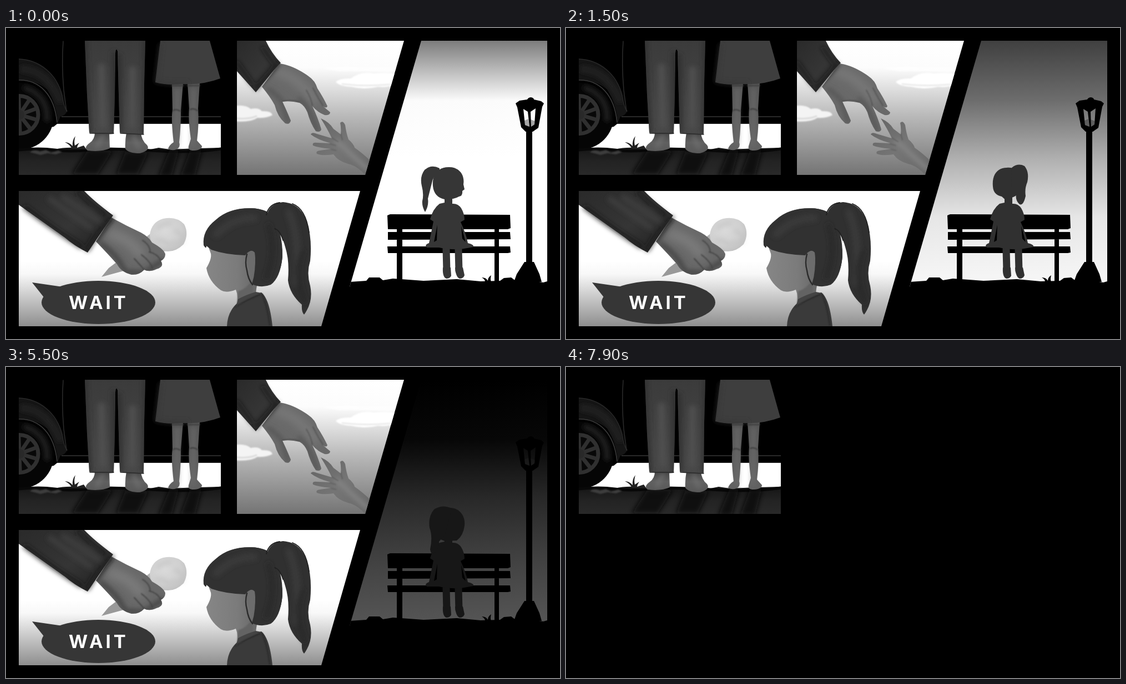
Recreate the animation shown at these times as an HTML page. Size 998 px wide and 561 px high, loop 8000 ms.

```html
<!DOCTYPE html>
<html lang="en">
<head>
<meta charset="utf-8">
<title>Wait</title>
<style>
html, body { margin: 0; width: 100%; height: 100%; overflow: hidden; background: #000; }
svg { display: block; width: 100vw; height: 100vh; }
.line { fill: none; stroke-linecap: round; stroke-linejoin: round; }
.say { font: 700 33px Inter, "Open Sans", sans-serif; letter-spacing: 5px; }
.off { visibility: hidden; }
#girl path, #girl ellipse { fill: var(--c); }
#girl .leg { fill: none; stroke: var(--c); stroke-width: 13; stroke-linecap: round; stroke-linejoin: round; }
#girl .gap { fill: #000; }
</style>
</head>
<body>
<svg viewBox="0 0 998 561" preserveAspectRatio="none">
<defs>
  <clipPath id="p1"><path d="M23 23H387V265H23Z"/></clipPath>
  <clipPath id="p2"><path d="M416 23H717L647 265H416Z"/></clipPath>
  <clipPath id="p3"><path d="M23 294H638L568 538H23Z"/></clipPath>
  <clipPath id="p4"><path d="M748 23H975V467H619Z"/></clipPath>
  <clipPath id="pants"><path id="pantsShape" d="M142 23H251L249 100L248 192Q226 193 205 189L203 120L201 42Q198 34 197 46L196 120L194 191Q172 193 150 189L146 120Z"/></clipPath>
  <clipPath id="adult"><path id="adultShape" d="M492 64C510 66 530 76 545 87Q557 95 561 109Q572 126 579 141Q577 146 571 141L584 152Q584 158 574 157Q561 152 552 141Q562 162 568 183Q566 189 558 186Q548 171 543 152Q538 140 529 135Q511 131 498 133Q506 150 513 167Q511 175 503 172Q489 160 484 139Q476 124 461 106Z"/></clipPath>
  <clipPath id="grip"><path id="gripShape" d="M190 342Q215 356 243 369Q258 377 263 387Q285 399 287 408Q287 416 279 420Q286 431 271 435Q258 441 249 436Q240 446 226 445Q207 440 200 426Q184 408 162 385Z"/></clipPath>
  <filter id="b1" x="-20%" y="-20%" width="140%" height="140%"><feGaussianBlur stdDeviation="1.2"/></filter>
  <filter id="b4" x="-40%" y="-40%" width="180%" height="180%"><feGaussianBlur stdDeviation="4"/></filter>
  <filter id="b8" x="-50%" y="-50%" width="200%" height="200%"><feGaussianBlur stdDeviation="8"/></filter>
  <linearGradient id="day2" gradientUnits="userSpaceOnUse" x1="0" y1="23" x2="0" y2="265">
    <stop offset="0" stop-color="#fff"/><stop offset=".2" stop-color="#fcfcfc"/>
    <stop offset=".56" stop-color="#b9b9b9"/><stop offset="1" stop-color="#747474"/>
  </linearGradient>
  <linearGradient id="day3" gradientUnits="userSpaceOnUse" x1="0" y1="420" x2="0" y2="538">
    <stop offset="0" stop-color="#fff"/><stop offset=".2" stop-color="#f8f8f8"/><stop offset="1" stop-color="#8e8e8e"/>
  </linearGradient>
  <linearGradient id="night" gradientUnits="userSpaceOnUse" x1="0" y1="23" x2="0" y2="455">
    <stop offset="0"/><stop offset=".25"/><stop offset=".49"/><stop offset=".735"/><stop offset="1"/>
  </linearGradient>
  <linearGradient id="soil" x1="0" y1="0" x2="0" y2="1"><stop offset="0" stop-color="#151515"/><stop offset=".5" stop-color="#232323"/><stop offset="1" stop-color="#292929"/></linearGradient>
  <linearGradient id="cloth" x1="0" y1="0" x2="0" y2="1"><stop offset="0" stop-color="#3b3b3b"/><stop offset="1" stop-color="#484848"/></linearGradient>
  <linearGradient id="foot" x1="0" y1="0" x2="0" y2="1"><stop offset="0" stop-color="#424242"/><stop offset=".5" stop-color="#606060"/><stop offset="1" stop-color="#585858"/></linearGradient>
  <linearGradient id="shin" x1="0" y1="0" x2="0" y2="1"><stop offset="0" stop-color="#555"/><stop offset="1" stop-color="#626262"/></linearGradient>
  <linearGradient id="sleeve" x1="0" y1="0" x2="1" y2="1"><stop offset="0" stop-color="#2a2a2a"/><stop offset=".55" stop-color="#353535"/><stop offset="1" stop-color="#1f1f1f"/></linearGradient>
  <linearGradient id="skin" x1="0" y1="0" x2="1" y2="0"><stop offset="0" stop-color="#868686"/><stop offset=".6" stop-color="#7b7b7b"/><stop offset="1" stop-color="#666"/></linearGradient>
  <linearGradient id="small" x1="0" y1="0" x2="1" y2="1"><stop offset="0" stop-color="#636363"/><stop offset=".5" stop-color="#757575"/><stop offset="1" stop-color="#696969"/></linearGradient>
  <radialGradient id="scoop" cx=".4" cy=".35" r=".75"><stop offset="0" stop-color="#dadada"/><stop offset=".6" stop-color="#d0d0d0"/><stop offset="1" stop-color="#bcbcbc"/></radialGradient>
</defs>
<rect width="998" height="561"/>

<g id="car" clip-path="url(#p1)">
  <path d="M23 172H387V222H23Z" fill="#fff"/>
  <path d="M23 23H387V173H92L86 178L23 190Z"/>
  <path d="M23 56C60 57 92 83 101 122Q104 142 110 150Q108 157 98 160L93 172Q92 140 74 111Q54 94 23 94Z" fill="#151515"/>
  <path d="M30 74Q75 78 97 130" class="line" stroke="#202020" stroke-width="12" filter="url(#b4)"/>
  <path d="M23 56C60 57 92 83 101 122Q104 142 110 150" class="line" stroke="#292929" stroke-width="1.5"/>
  <path d="M103 24Q100 65 104 112L109 150" class="line" stroke="#2c2c2c" stroke-width="1.5"/>
  <path d="M23 94C60 93 87 120 92 170" class="line" stroke="#3b3b3b" stroke-width="1.6"/>
  <path d="M100 160H387" stroke="#292929" stroke-width="2"/>
  <path d="M92 172H387" stroke="#141414" stroke-width="2"/>
  <circle cx="26" cy="159" r="60" fill="#050505"/>
  <path d="M35 108Q75 122 74 165" class="line" stroke="#202020" stroke-width="9" filter="url(#b4)"/>
  <circle cx="24" cy="156.500" r="34" fill="#080808" stroke="#303030" stroke-width="7"/>
  <g id="spokes" stroke="#2f2f2f" stroke-width="7"></g>
  <circle cx="24" cy="156.500" r="9" fill="#292929"/>
  <path d="M23 219Q60 215 88 219Q112 213 145 218L260 219L275 216L295 219Q345 217 387 216V265H23Z" fill="url(#soil)"/>
  <path d="M23 220Q60 216 88 220T150 220T260 221T387 218" class="line" stroke="#080808" stroke-width="5"/>
  <path d="M43 224Q51 218 61 223L72 220L81 225L94 221L101 224L90 228L75 226L62 229Z" fill="#3d3d3d" filter="url(#b1)"/>
  <path d="M119 218Q114 209 106 206Q114 206 120 213Q119 202 125 195Q122 204 124 212L132 207Q128 213 128 216L140 212L145 219Z" fill="#202020"/>
</g>

<g id="pair" clip-path="url(#p1)">
  <g filter="url(#b4)" opacity=".9">
    <path d="M146 221H193L166 264H118ZM214 224H257L238 264H198ZM294 220H312L299 268H274ZM331 220H353L341 268H313Z" fill="#070707"/>
  </g>
  <path d="M160 188H186L187 217Q172 224 147 221Q139 216 151 207Q160 201 160 188ZM217 188H243Q244 203 254 211Q261 221 241 226Q221 226 215 218Q214 205 217 188Z" fill="url(#foot)"/>
  <path d="M175 194L164 214M230 196L239 216" class="line" stroke="#737373" stroke-width="5" filter="url(#b4)"/>
  <use href="#pantsShape" fill="url(#cloth)"/>
  <g clip-path="url(#pants)" class="line" filter="url(#b4)">
    <path d="M142 23L147 125L151 190M194 45V190M204 50L206 190M251 23L248 190" stroke="#2e2e2e" stroke-width="7"/>
    <path d="M172 70L174 175M228 75L227 175" stroke="#505050" stroke-width="12"/>
  </g>
  <path d="M151 190H194M206 190L248 192" class="line" stroke="#292929" stroke-width="1.5"/>
  <path d="M299 100H319L315 148Q315 180 312 206Q315 215 307 219Q299 222 292 218Q294 211 302 206Q297 165 300 148Z" fill="url(#shin)"/>
  <path d="M327 100H349L346 145Q348 173 344 203L353 213Q353 220 338 221Q327 221 329 213L333 200Q328 165 330 145Z" fill="url(#shin)"/>
  <path d="M309 110L308 210M338 110L337 211" class="line" stroke="#737373" stroke-width="4" filter="url(#b4)"/>
  <path d="M301 149Q306 145 314 150M332 147Q338 144 345 149M299 104H319M327 104H349" class="line" stroke="#3e3e3e" stroke-width="2" filter="url(#b1)"/>
  <path d="M278 23H367L386 91Q355 103 318 101Q292 104 269 98Z" fill="#3e3e3e"/>
  <path d="M279 30L271 96Q300 101 327 99" class="line" stroke="#343434" stroke-width="4" filter="url(#b4)"/>
</g>

<g id="rest">
<g clip-path="url(#p2)">
  <path d="M416 23H717V265H416Z" fill="url(#day2)"/>
  <g filter="url(#b1)">
    <path d="M570 73Q608 68 650 72Q680 70 708 74L690 80Q640 77 600 78Z" fill="#fff" opacity=".7"/>
    <path d="M594 97Q602 90 621 91Q640 77 662 82Q688 79 708 84L703 101Q690 108 670 106Q645 112 622 106Q600 105 594 97Z" fill="#fff"/>
    <path d="M606 101Q645 106 690 102" class="line" stroke="#ececec" stroke-width="3"/>
    <path d="M410 141Q430 137 441 146Q455 143 461 150Q478 149 480 157Q470 163 453 162Q440 171 410 168Z" fill="#f4f4f4"/>
    <path d="M416 163Q437 165 451 159" class="line" stroke="#ddd" stroke-width="3"/>
  </g>
  <use href="#adultShape" fill="#696969"/>
  <g clip-path="url(#adult)">
    <path d="M491 79Q528 90 557 131" class="line" stroke="#7a7a7a" stroke-width="15" filter="url(#b8)"/>
    <path d="M472 110Q487 119 498 133L508 168M528 128Q543 137 560 184" class="line" stroke="#555" stroke-width="7" filter="url(#b4)"/>
    <path d="M498 132Q514 128 529 133M541 112Q550 127 552 140M553 108Q561 125 571 140" class="line" stroke="#4b4b4b" stroke-width="1.4" filter="url(#b1)"/>
  </g>
  <path d="M416 23H468Q478 45 495 63Q488 69 473 88L450 116Q434 98 416 78Z" fill="url(#sleeve)"/>
  <path d="M489 65L450 109M463 36L481 62M416 62L444 101" class="line" stroke="#181818" stroke-width="5" filter="url(#b4)"/>
  <path d="M567 163Q583 170 590 182Q598 188 603 192Q604 180 602 171Q607 166 611 175Q613 190 617 201Q627 210 628 216Q640 224 656 239L648 266Q632 248 616 245Q598 240 590 228Q570 231 560 227Q557 222 566 221L585 218Q563 216 553 212Q551 206 560 207L585 208Q560 201 549 192Q551 187 560 191L587 199Q579 182 567 163Z" fill="url(#small)"/>
  <path d="M594 204Q610 215 618 225L650 253" class="line" stroke="#858585" stroke-width="7" filter="url(#b4)"/>
  <path d="M587 198L598 205M584 209L594 212M586 219L595 221M603 191L606 202" class="line" stroke="#555" stroke-width="1.2" filter="url(#b1)"/>
</g>

<g clip-path="url(#p3)">
  <path d="M23 294H638V538H23Z" fill="url(#day3)"/>
  <path d="M172 449L185 433L201 421L216 437Z" fill="#999"/>
  <path d="M244 383L263 369L294 399L275 407L254 404Z" fill="#b3b3b3"/>
  <path d="M259 373Q262 350 283 344Q307 339 321 354Q330 371 320 390Q306 404 290 403Q278 403 272 393Q259 388 259 373Z" fill="url(#scoop)"/>
  <path d="M270 383Q285 381 293 391Q307 384 318 385M273 361Q284 351 297 353M304 366Q314 368 318 377" class="line" stroke="#bfbfbf" stroke-width="4" filter="url(#b4)"/>
  <use href="#gripShape" fill="#686868"/>
  <g clip-path="url(#grip)" class="line">
    <path d="M190 372Q226 382 241 407" stroke="#7d7d7d" stroke-width="18" filter="url(#b8)"/>
    <path d="M172 390Q204 412 214 440L248 442L282 420M188 345L164 382" stroke="#474747" stroke-width="9" filter="url(#b4)"/>
    <path d="M246 383Q259 391 260 404M258 404Q273 407 279 420M244 409Q260 421 264 434M231 416Q243 429 249 436" stroke="#444" stroke-width="2" filter="url(#b1)"/>
  </g>
  <path d="M23 294H141Q159 313 193 338Q174 365 147 405Q123 393 106 378L23 319Z" fill="url(#sleeve)"/>
  <g class="line" filter="url(#b4)">
    <path d="M190 343Q163 369 147 399M130 296Q145 313 178 337M35 324Q84 362 135 394" stroke="#1a1a1a" stroke-width="7"/>
    <path d="M80 309L151 359M104 306L166 347" stroke="#3e3e3e" stroke-width="10"/>
  </g>

  <path d="M441 459Q494 474 498 410Q497 365 470 331Q451 322 419 327Q382 333 362 366L362 392L433 405Z" fill="#303030"/>
  <path d="M361 385L369 407Q371 416 361 433Q365 457 387 473Q397 479 414 472Q420 486 415 505L449 487Q451 467 454 455L449 402Z" fill="url(#skin)"/>
  <path d="M418 475Q433 471 443 455L447 485L416 501Z" fill="#636363" filter="url(#b1)"/>
  <path d="M356 392Q353 365 378 346Q402 324 442 325Q464 325 478 340Q499 365 498 413Q494 451 477 463Q460 470 443 462Q451 438 448 405Q438 399 431 410Q395 409 370 400L361 393Q361 400 356 392Z" fill="#313131"/>
  <path d="M433 409Q441 397 448 405Q451 424 445 445Q435 437 433 409Z" fill="#6c6c6c"/>
  <path d="M434 408Q430 423 434 437Q436 453 444 463" class="line" stroke="#2b2b2b" stroke-width="2.5"/>
  <path d="M470 338Q474 317 499 314Q530 316 542 350Q552 380 548 420Q541 442 548 465Q554 494 537 517Q532 512 533 499Q511 480 508 455Q511 420 503 395Q497 372 484 362Q489 374 475 349Z" fill="#303030"/>
  <path d="M469 337Q473 318 493 315M516 317Q540 326 546 369M484 362Q494 365 499 383" class="line" stroke="#202020" stroke-width="1.8"/>
  <g class="line" filter="url(#b4)">
    <path d="M379 372Q410 342 447 343M510 333Q530 381 523 459" stroke="#3a3a3a" stroke-width="12"/>
    <path d="M473 356Q488 402 469 450M534 403Q517 445 538 493" stroke="#272727" stroke-width="7"/>
  </g>
  <path d="M398 538Q399 511 418 495Q440 482 460 477Q475 489 480 538Z" fill="#3a3a3a"/>
  <path d="M418 489L414 504L426 496Q448 484 460 478L450 476Q433 481 418 489Z" fill="#444"/>
  <path d="M414 503Q428 493 457 481M461 480Q471 501 475 536" class="line" stroke="#292929" stroke-width="2" filter="url(#b1)"/>

  <path d="M47 459L102 467L70 488Z" fill="#363636"/>
  <ellipse cx="166.500" cy="495" rx="102.500" ry="39" fill="#363636"/>
  <text class="say" x="167" y="507" text-anchor="middle" fill="#fff">WAIT</text>
</g>

<g clip-path="url(#p4)">
  <path d="M619 23H975V467H619Z" fill="url(#night)"/>
  <path d="M619 458L649 456L654 450L673 450L679 455L697 452L725 454L752 456L812 453L855 457L890 456L897 451L910 450L918 456L937 455L968 459L975 457V470H619Z"/>
  <path d="M863 458Q863 453 857 450Q865 450 868 456Q868 450 874 446Q872 453 874 458Z"/>
  <path d="M687 338L692 336L908 337L909 361L904 363H688ZM688 368H908L909 381L688 382ZM687 394H908L909 405L904 406H688ZM704 361H714V458H704ZM880 361H888V458H880Z"/>
  <path d="M937 184H948V423H937ZM934 422H951L961 444L965 458H915L920 444Z"/>
  <path fill-rule="evenodd" d="M918 136L925 131L939 129Q941 125 946 125Q951 126 951 129L964 132L969 136L966 142L959 180L949 187H936L928 179L921 143ZM932 146L940 151L943 178L935 175ZM945 151L954 145L952 174L946 178Z"/>
  <path d="M934 167L941 164L943 178L935 175ZM945 165L953 168L952 174L946 178Z" fill="#222" opacity=".4"/>
  <g id="girl">
    <g data-legs="0">
      <path class="leg" d="M793 399L794 438M815 399L816 438"/>
      <path d="M787 432H801L802 447Q800 452 793 452Q786 449 787 432ZM809 432H823L826 446Q824 452 817 452Q810 449 809 432Z"/>
    </g>
    <g data-legs="1">
      <path class="leg" d="M792 399Q796 426 807 437M815 399Q812 426 802 441"/>
      <path d="M795 434H808L815 437Q815 444 806 444L805 452Q799 457 794 451Z"/>
    </g>
    <g id="top">
      <path d="M790 304H804V317Q814 316 820 325Q826 335 826 346L819 350Q829 371 832 388Q844 391 842 395L831 397Q809 402 780 396H758Q753 391 762 388L770 349L764 345Q769 326 781 317L790 315Z"/>
      <path class="gap" d="M777 355L771 386L776 383ZM820 357L828 386L822 380Z"/>
      <g data-head="0">
        <path d="M797 251C815 250 827 264 824 282L826 291L822 294Q823 303 816 304Q806 310 790 309Q771 305 769 285C767 264 779 251 797 251Z"/>
        <path d="M781 253Q766 245 754 256Q745 268 749 285Q753 300 750 312Q749 322 755 332Q762 320 760 308Q764 292 767 280Q769 267 781 260Z"/>
      </g>
      <g data-head="1">
        <path d="M794 252C812 250 822 265 820 282Q819 301 803 306L796 314L785 304Q770 301 769 286C767 265 777 252 794 252Z"/>
        <path d="M803 252Q814 243 826 249Q835 260 831 278Q826 290 828 303Q824 321 817 318Q809 311 811 299L802 285Z"/>
      </g>
      <g data-head="2">
        <path d="M798 254C816 253 828 268 826 286Q824 304 812 313L790 314L783 311Q768 302 768 284C768 266 780 255 798 254Z"/>
        <path d="M803 255Q786 247 771 257Q760 270 763 290Q769 306 764 329Q766 341 772 336Q781 325 780 315L791 302Z"/>
      </g>
    </g>
  </g>
</g>
</g>
</svg>
<script>
const LOOP = 8000, BLACK = 5900, CAR = 6900, PAIR = 7900;
const $ = id => document.getElementById(id);
const all = q => [...document.querySelectorAll(q)];
const show = (el, on) => el.classList.toggle('off', !on);
const gray = v => { v = Math.round(v); return `rgb(${v},${v},${v})`; };

// step, five sky tones from top to bottom, figure tone
const dusk = [
  [0, 124, 251, 255, 255, 255, 54],
  [4, 76, 130, 202, 254, 255, 54],
  [11, 34, 57, 108, 170, 222, 32],
  [16, 16, 24, 47, 72, 92, 20],
  [18, 0, 7, 40, 64, 84, 23]
];

function tones(step) {
  const i = Math.max(1, dusk.findIndex(k => k[0] >= step));
  const a = dusk[i - 1], b = dusk[i], p = (step - a[0]) / (b[0] - a[0]);
  return a.slice(1).map((v, n) => v + (b[n + 1] - v) * p);
}

for (let n = 0; n < 10; n++) {
  const line = document.createElementNS('http://www.w3.org/2000/svg', 'line');
  const a = (n * 36 + 16) * Math.PI / 180;
  for (const [k, v] of Object.entries({
    x1: 24, y1: 156.5, x2: 24 + 33 * Math.cos(a), y2: 156.5 + 33 * Math.sin(a)
  })) line.setAttribute(k, v);
  $('spokes').append(line);
}

const stops = all('#night stop'), heads = all('[data-head]'), legs = all('[data-legs]');

function draw(t) {
  const step = Math.max(0, Math.min(18, Math.floor((t - 300) / 200)));
  const tone = tones(step);
  stops.forEach((s, i) => s.setAttribute('stop-color', gray(tone[i])));
  $('girl').style.setProperty('--c', gray(tone[5]));

  const head = step < 3 ? 0 : step < 8 ? 1 : 2;
  const crossed = t >= 2700 && Math.floor((t - 2700) / 400) % 2 === 0 ? 1 : 0;
  const lit = t < BLACK;
  show($('car'), lit || t >= CAR);
  show($('pair'), lit || t >= PAIR);
  $('rest').style.display = lit ? '' : 'none';
  heads.forEach((h, i) => show(h, i === head));
  legs.forEach((l, i) => show(l, i === crossed));
  $('top').setAttribute('transform', `translate(0 ${-crossed})`);
}

const start = performance.now();
function tick() {
  draw((performance.now() - start) % LOOP);
  requestAnimationFrame(tick);
}
draw(0);
requestAnimationFrame(tick);
</script>
</body>
</html>
```
